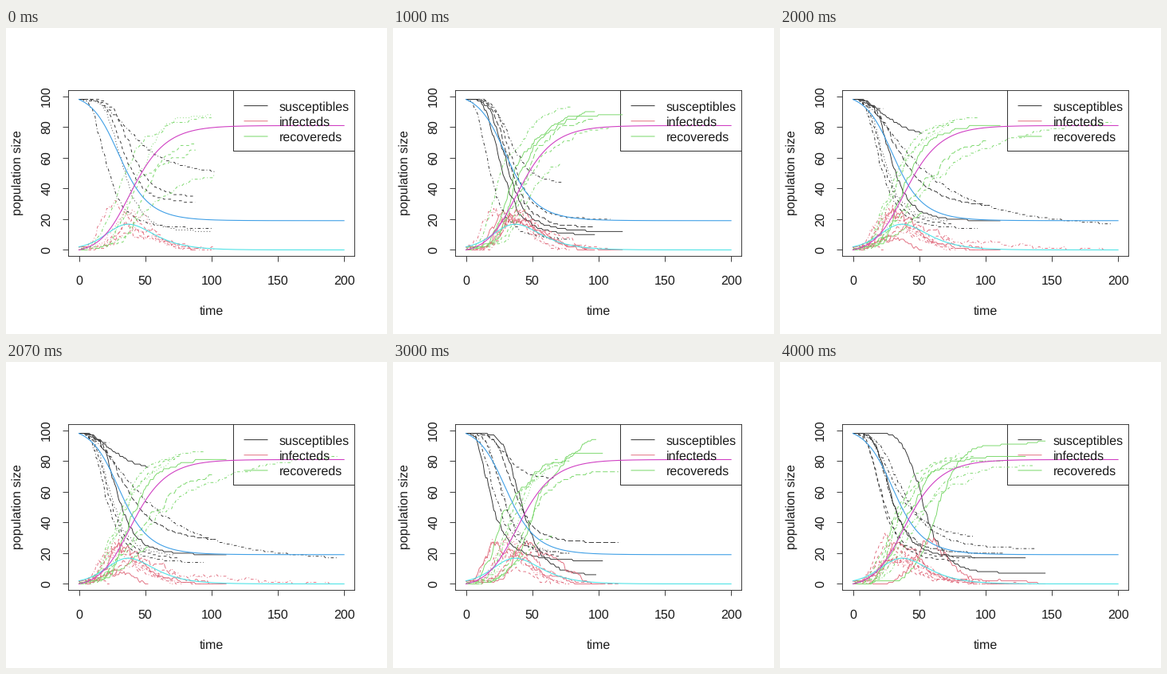
Recreate the animation shown at these times as a matplotlib script. Size 478 by 384 pixels, loop 4990 ms.

```python
import numpy as np
import matplotlib.pyplot as plt
from matplotlib.animation import ArtistAnimation

W, H, DPI = 478, 384, 72
LEFT, RIGHT, TOP, BOTTOM = 78.2, 437.4, 78.0, 286.2
BLACK, RED, GREEN = "#2b2b2b", "#e0697b", "#74d664"
BLUE, CYAN, MAGENTA = "#3f9fe6", "#4fe2e6", "#d03fc3"
SOLID, DASH, DOT = "-", (0, (4, 4)), (0, (1, 3))
DOTDASH, LONG, TWO = (0, (1, 3, 4, 3)), (0, (7, 3)), (0, (2, 2, 6, 2))

plt.rcParams.update({"font.family": "Liberation Sans", "font.size": 16,
                     "text.hinting": "none", "text.color": "#1a1a1a"})
fig = plt.figure(figsize=(W / DPI, H / DPI), dpi=DPI, facecolor="white")
ax = fig.add_axes([LEFT / W, 1 - BOTTOM / H,
                   (RIGHT - LEFT) / W, (BOTTOM - TOP) / H])
ax.set(xlim=(-8, 208), ylim=(-4, 104),
       xticks=range(0, 201, 50), yticks=range(0, 101, 20))
ax.tick_params(length=7, width=0.9, color=BLACK,
               labelbottom=False, labelleft=False)
for spine in ax.spines.values():
    spine.set(linewidth=0.9, color=BLACK)


def px(x, y):
    """Stage pixels, measured from the top left, to figure fractions."""
    return x / W, 1 - y / H


def label(x, y, text, rotation=0, ha="center"):
    fig.text(*px(x, y), text, rotation=rotation, ha=ha, va="baseline",
             rotation_mode="anchor")


def stroke(points, color, snap=None):
    xs, ys = zip(*(px(*p) for p in points))
    ax.plot(xs, ys, color=color, lw=0.95, snap=snap,
            transform=fig.transFigure, zorder=1)


def draw_frame():
    for v in range(0, 201, 50):
        label(91.6 + v * 1.663, 322, str(v))
    for v in range(0, 101, 20):
        label(55, 278.5 - v * 1.928, str(v), 90)
    label(258, 360, "time")
    label(18.6, 182, "population size", 90)
    stroke([(284.6, TOP), (284.6, 154.3), (RIGHT, 154.3)], BLACK)
    rows = (("susceptibles", BLACK), ("infecteds", RED), ("recovereds", GREEN))
    for i, (name, color) in enumerate(rows):
        y = 97.6 + 19.2 * i
        stroke([(299, y), (328, y)], color, snap=False)
        label(343, y + 5.6, name, ha="left")


def draw_model(beta=0.2, gamma=0.1):
    """Deterministic SIR curves, one step per unit of time."""
    states = [(98, 2, 0)]
    for _ in range(200):
        s, i, r = states[-1]
        new, healed = beta * s * i / 100, gamma * i
        states.append((s - new, i + new - healed, r + healed))
    for y, color in zip(np.transpose(states), (BLUE, CYAN, MAGENTA)):
        ax.plot(y, color=color, lw=1.1, snap=False, zorder=3)


def run(style, end, floor, mid, power=None):
    """One random epidemic: 98 susceptibles fall to floor, half of them by mid.

    Infection times follow a log-logistic curve cut off at the end, and every
    illness lasts an exponentially distributed time.
    """
    power = power or 1 + mid / 9
    cases = 98 - floor
    share = (np.arange(cases) + 0.5) / cases / (1 + (mid / end) ** power)
    caught = mid * (share / (1 - share)) ** (1 / power)
    caught = np.clip(caught + rng.normal(0, 0.8, cases), 0.5, end - 0.5)
    ill_from = np.append(caught, [0, 0])
    healed = ill_from + rng.exponential(10, cases + 2)
    healed = np.where(healed > end, rng.uniform(ill_from, end), healed)

    t = np.arange(0, end + 1)
    s = 98 - np.searchsorted(np.sort(caught), t)
    r = np.searchsorted(np.sort(healed), t)
    return [ax.plot(t, y, color=color, ls=style, lw=0.9, snap=False,
                    zorder=2)[0]
            for y, color in ((s, BLACK), (100 - s - r, RED), (r, GREEN))]


def draw_scenes():
    """Line style, end time, final susceptibles, half-way time per epidemic."""
    yield (run(DOTDASH, 100, 14, 21), run(DOT, 100, 12, 33),
           run(DASH, 88, 31, 34), run(DASH, 88, 35, 39),
           run(DOTDASH, 103, 51, 43, 3), run(DOTDASH, 13, 97, 5))
    yield (run(SOLID, 118, 12, 31), run(SOLID, 97, 10, 27),
           run(DOTDASH, 79, 7, 18), run(DOTDASH, 72, 44, 34),
           run(DASH, 109, 20, 35), run(LONG, 97, 15, 33))
    yield (run(SOLID, 52, 76, 30, 2.5), run(DOTDASH, 195, 17, 50, 2),
           run(LONG, 101, 29, 36, 3), run(SOLID, 111, 19, 29),
           run(DOTDASH, 94, 14, 21), run(DASH, 76, 17, 23),
           run(DOT, 72, 19, 24), run(DASH, 23, 92, 12))
    yield (run(SOLID, 98, 6, 42), run(SOLID, 103, 15, 19),
           run(LONG, 115, 27, 36), run(DASH, 66, 69, 31),
           run(DOT, 77, 20, 28), run(DOTDASH, 78, 20, 22),
           run(DASH, 70, 18, 28))
    yield (run(SOLID, 145, 7, 53), run(SOLID, 130, 17, 29),
           run(DOTDASH, 137, 23, 38, 3.5), run(DOTDASH, 91, 31, 33, 3),
           run(DASH, 92, 17, 22), run(TWO, 113, 20, 28),
           run(DASH, 80, 15, 22))


rng = np.random.default_rng(7)
draw_frame()
draw_model()
scenes = [sum(runs, []) for runs in draw_scenes()]
anim = ArtistAnimation(fig, scenes, interval=998, repeat=True, repeat_delay=0)
plt.show()
```
